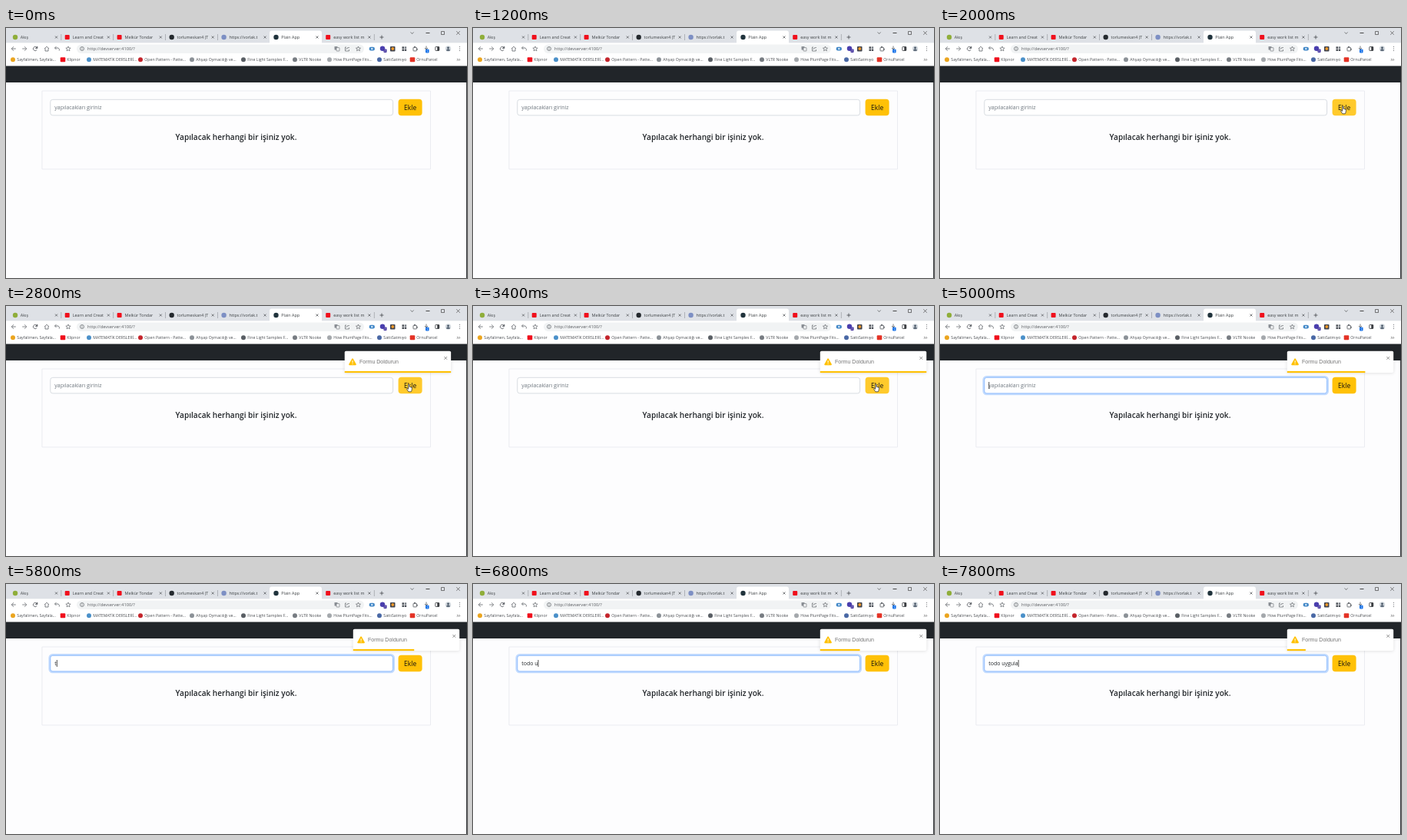
An HTML page with a canvas for the animation above (8 s loop, 600 by 326 pixels).

```html
<!DOCTYPE html>
<html lang="tr">
<head>
<meta charset="utf-8">
<title>Todo</title>
<style>
  html, body { margin: 0; width: 100%; height: 100%; overflow: hidden; background: #fdfdfe; }
  canvas { display: block; width: 600px; height: 326px; }
</style>
</head>
<body>
<canvas id="stage" width="600" height="326"></canvas>
<script>
const ctx = document.getElementById('stage').getContext('2d');
const LOOP = 8000, STEP = 200;
const UI = '"Open Sans", "Noto Sans", sans-serif';
const ARIAL = '"Liberation Sans", Arial, sans-serif';
const AMBER = '#ffc107', RED = '#f00f1c', INK = '#5f6368';

const clamp = (v, lo = 0, hi = 1) => Math.min(hi, Math.max(lo, v));
const easeOut = p => 1 - (1 - p) ** 3;

function rect(x, y, w, h, fill) {
  ctx.fillStyle = fill;
  ctx.fillRect(x, y, w, h);
}

function box(x, y, w, h, r, fill, stroke, line = 0.8) {
  ctx.beginPath();
  ctx.roundRect(x, y, w, h, r);
  if (fill) { ctx.fillStyle = fill; ctx.fill(); }
  if (stroke) { ctx.strokeStyle = stroke; ctx.lineWidth = line; ctx.stroke(); }
}

function disc(x, y, r, fill, stroke, line = 0.8) {
  box(x - r, y - r, 2 * r, 2 * r, r, fill, stroke, line);
}

function path(points, stroke, line = 0.8, fill) {
  ctx.beginPath();
  for (let i = 0; i < points.length; i += 2) ctx.lineTo(points[i], points[i + 1]);
  if (fill) { ctx.closePath(); ctx.fillStyle = fill; ctx.fill(); }
  if (stroke) { ctx.strokeStyle = stroke; ctx.lineWidth = line; ctx.stroke(); }
}

function cross(x, y, r, color, line = 0.7) {
  path([x - r, y - r, x + r, y + r], color, line);
  path([x - r, y + r, x + r, y - r], color, line);
}

function star(x, y, size) {
  const points = [];
  for (let k = 0; k <= 10; k++) {
    const r = k % 2 ? size * 0.45 : size, a = k * Math.PI / 5 - Math.PI / 2;
    points.push(x + r * Math.cos(a), y + r * Math.sin(a));
  }
  path(points, INK, 0.7);
}

function label(str, x, y, size, color, { weight = 400, family = UI, align = 'left' } = {}) {
  ctx.font = `${weight} ${size}px ${family}`;
  ctx.textAlign = align;
  ctx.fillStyle = color;
  ctx.fillText(str, x, y);
}

const tabs = [
  ['Akış', '#8fae3a'], ['Learn and Creat', RED], ['Melkür Tondar', RED],
  ['torlumeskan4 (T', '#24292e'], ['https://vorlak.t', '#7d8fc4'],
  ['Plain App', '#20333c'], ['easy work list m', RED]
];
const ACTIVE_TAB = 5;

function drawTabs() {
  rect(0, 0, 600, 19.5, '#dee1e6');
  tabs.forEach(([name, color], i) => {
    const x = 4 + i * 67.9;
    if (i === ACTIVE_TAB) box(x - 0.5, 3.5, 68, 18, [3, 3, 0, 0], '#fff');
    else if (i !== ACTIVE_TAB - 1) rect(x + 67.5, 8, 0.7, 8, '#9a9da2');
    if (color === RED) box(x + 4.8, 9, 6, 6, 1, color);
    else disc(x + 8, 12, 3.2, color);
    ctx.save();
    ctx.beginPath();
    ctx.rect(x + 14, 4, 47, 16);
    ctx.clip();
    label(name, x + 14.8, 13.9, 5.4, '#3c4043');
    ctx.restore();
    cross(x + 61.5, 12, 1.5, '#45484c');
  });
  path([486.5, 12, 491.5, 12], '#45484c');
  path([489, 9.5, 489, 14.5], '#45484c');
  path([526.6, 5.5, 528.6, 7.5, 530.6, 5.5], '#444', 0.7);
  path([546.5, 6.5, 551.5, 6.5], '#333', 0.9);
  box(566.5, 4.5, 4, 4, 0, null, '#444', 0.7);
  cross(588.5, 6.5, 2.2, '#444');
}

function arrow(x, dir, color) {
  path([x - 2.8 * dir, 27, x + 2.8 * dir, 27], color);
  path([x, 24.3, x + 2.8 * dir, 27, x, 29.7], color);
}

function drawToolbar() {
  rect(0, 19.5, 600, 30.5, '#fff');
  arrow(10, -1, INK);
  arrow(24, 1, '#6c7074');
  ctx.beginPath();
  ctx.arc(38, 27, 2.6, 0.5, 5.6);
  ctx.strokeStyle = INK;
  ctx.lineWidth = 0.9;
  ctx.stroke();
  path([40.9, 24, 40.9, 26.5, 38.5, 26.5], INK, 0.8, INK);
  path([50, 27, 53, 24.2, 56, 27], INK);
  path([51, 26.5, 51, 30, 55, 30, 55, 26.5], INK);
  path([65.5, 24, 63.5, 26, 65.5, 28], INK);
  path([63.5, 26, 68, 26, 69.3, 27.5, 69.3, 29.5], INK);
  star(81, 27.2, 3.3);

  box(92, 21.5, 374, 11.5, 5.7, '#f1f3f4');
  disc(99, 27, 2.5, null, INK, 0.7);
  path([99, 26.6, 99, 28.4], INK, 0.7);
  rect(98.65, 25.2, 0.7, 0.7, INK);
  label('http://devserver:4100/?', 106, 29.1, 5.7, '#5a5d61');

  box(427.5, 24, 4, 4.5, 0.5, '#8b9096');
  box(430, 25.6, 4, 4.4, 0.5, '#f1f3f4', INK, 0.6);
  path([443, 25, 441.5, 25, 441.5, 30, 446.5, 30, 446.5, 28], INK, 0.7);
  path([443, 28, 444, 26, 447, 25.5], INK, 0.7);
  star(458.5, 27.2, 3.2);

  box(472.7, 24.7, 7.2, 4.8, 2, '#4388c7');
  disc(476.3, 27.1, 1.2, '#e3f0fb');
  disc(490, 26.7, 3.2, '#4a3fae');
  box(491.5, 27.5, 4, 4.5, 0.8, '#3e2e9b');
  label('2', 493.5, 31.4, 4, '#fff', { align: 'center' });
  box(500, 24, 6.5, 6.5, 0.8, '#41444e');
  disc(503.3, 27, 1.9, '#f09a2a');
  for (const dx of [0, 3.2]) for (const dy of [0, 3.2])
    rect(515.5 + dx, 24.3 + dy, 2.5, 2.5, dx && !dy ? '#767c84' : '#4d5259');
  box(530, 25.3, 4.6, 4.6, 0.6, null, INK, 0.9);
  disc(532, 24.8, 1, INK);
  disc(534.9, 27.7, 1, INK);
  path([547, 23.5, 547, 28], '#4c5157');
  path([545, 26, 547, 28, 549, 26], '#4c5157');
  box(546, 27.8, 4.6, 4.6, 0.8, '#1a73e8');
  label('1', 548.3, 31.6, 4, '#fff', { align: 'center' });
  box(558.8, 24.5, 5, 5, 0.6, null, '#33363a');
  rect(561.3, 24.5, 2.5, 5, '#33363a');
  disc(575.5, 27, 3.7, '#d3d9df');
  disc(575.5, 25.8, 1.4, '#4a5868');
  box(573.3, 27.6, 4.4, 2.2, [1.6, 1.6, 0, 0], '#4a5868');
  for (const y of [24.5, 27, 29.5]) disc(590.5, y, 0.6, INK);
}

const bookmarks = [
  [9, 'Sayfalimen, Sayfala...', '#eba51f'], [74, 'Klipnor', RED],
  [108, 'MATEMATİK DERSLERİ...', '#4a90c9'], [175, 'Open Pattern - Patte...', '#c4242b'],
  [242, 'Ahşap Oymacılığı ve...', '#8b9197'], [309, 'Fine Light Samples F...', '#595e64'],
  [376, 'VLTR Nooke', '#777c82'], [421, 'How PlumPage Fits...', '#a4a8ac'],
  [486, 'SattıSatmıyo', '#4968a5'], [529, 'OrnuParcel', '#e43225']
];

function drawBookmarks() {
  for (const [x, name, color] of bookmarks) {
    if (color === RED || x > 500) box(x - 3.3, 38.3, 6.6, 6, 1, color);
    else disc(x, 41.3, 3, color);
    label(name, x + 5.3, 43.3, 5.2, '#4a4d51');
  }
  for (const x of [587, 589.3]) path([x, 40, x + 1.4, 41.4, x, 42.8], '#444', 0.7);
}

function drawPage(t) {
  rect(0, 50, 600, 276, '#fdfdfe');
  rect(0, 49.5, 600, 21.5, '#212529');
  box(46.9, 82, 505.6, 102, 0, '#fdfdfe', '#e6e8ee', 0.8);

  const focus = clamp((t - 4400) / 150);
  if (focus) box(56.7, 92.2, 448, 22.8, 4, null, `rgba(194,219,254,${focus})`, 2.6);
  box(57.8, 93.3, 445.8, 20.6, 3, '#fff', focus ? '#86b7fe' : '#d4d9de', 0.9);
  drawInput(t);

  const hovered = t >= 1800 && t < 3600;
  box(510.6, 92.8, 31, 21.4, 4, hovered ? '#ffca2c' : AMBER);
  label('Ekle', 526.1, 106.8, 8.5, '#111', { align: 'center' });
  label('Yapılacak herhangi bir işiniz yok.', 299.5, 146, 10.08, '#212529', { weight: 600, align: 'center' });
  rect(599, 71, 1, 255, '#34373a');
}

function drawInput(t) {
  const phrase = 'todo uygula', firstKey = 5800, focusAt = 4500;
  const count = clamp(Math.floor((t - firstKey) / 200) + 1, 0, phrase.length);
  const typed = phrase.slice(0, count);
  label(typed || 'yapılacakları giriniz', 63.3, 106, 6.95, typed ? '#212529' : '#6c757d');
  const blinkOn = Math.floor((t - focusAt) / 530) % 2 === 0;
  if (t >= focusAt && (typed || blinkOn))
    rect(63.4 + ctx.measureText(typed).width, 99, 0.8, 9, '#222');
}

// Slide in from the right with a damped overshoot: [progress, offset].
const bounce = [[0, 1290], [0.6, -11.2], [0.75, 4.3], [0.9, -2.1], [1, 0]];

function bounceOffset(p) {
  const i = bounce.findIndex(([at]) => p < at);
  if (i < 0) return 0;
  const [p0, x0] = bounce[i - 1], [p1, x1] = bounce[i];
  return x0 + (x1 - x0) * easeOut((p - p0) / (p1 - p0));
}

function drawToast(t) {
  if (t < 2400) return;
  ctx.save();
  ctx.translate(451.8 + bounceOffset(clamp((t - 2400) / 700)), 58.7);
  ctx.shadowColor = 'rgba(0,0,0,.13)';
  ctx.shadowBlur = 4;
  ctx.shadowOffsetY = 0.5;
  box(0, 0, 138.4, 28.4, 1.8, '#fff');
  ctx.shadowColor = 'transparent';

  ctx.lineJoin = 'round';
  path([10.3, 10.6, 14.2, 17.6, 6.4, 17.6, 10.3, 10.6], AMBER, 1.8, AMBER);
  rect(9.8, 12.4, 1, 3, '#fff');
  rect(9.8, 16.2, 1, 1, '#fff');
  label('Formu Doldurun', 19.2, 16.5, 7.05, '#757575', { family: ARIAL });
  cross(131.5, 9.2, 1.9, '#777', 0.8);

  const left = clamp(1 - (t - 3670) / 5000);
  rect(0, 26.2, 138.4 * left, 2.2, AMBER);
  ctx.restore();
}

function drawCursor(t) {
  if (t < 1400 || t >= 3600) return;
  const rest = easeOut(clamp((t - 1400) / 400));
  ctx.save();
  ctx.translate(523.5, 102 + 28 * (1 - rest));
  ctx.lineJoin = 'round';
  if (rest < 1) {
    path([0, 0, 0, 8, 1.9, 6.3, 3.2, 9, 4.4, 8.4, 3.2, 5.8, 5.6, 5.6, 0, 0], '#222', 0.7, '#fff');
  } else {
    path([0.2, 0.4, 1.2, 0, 1.8, 0.6, 1.8, 3.4, 4.6, 4, 5, 5.2, 4.6, 8, 3.8, 9.8,
      0.4, 9.8, -1.9, 6.4, -1.5, 5.4, 0.2, 6.4, 0.2, 0.4], '#222', 0.7, '#fff');
  }
  ctx.restore();
}

function render(now) {
  const t = Math.floor(now % LOOP / STEP) * STEP;
  drawTabs();
  drawToolbar();
  drawBookmarks();
  drawPage(t);
  drawToast(t);
  drawCursor(t);
}

const start = performance.now();
function tick() {
  render(performance.now() - start);
  requestAnimationFrame(tick);
}
tick();
</script>
</body>
</html>
```
